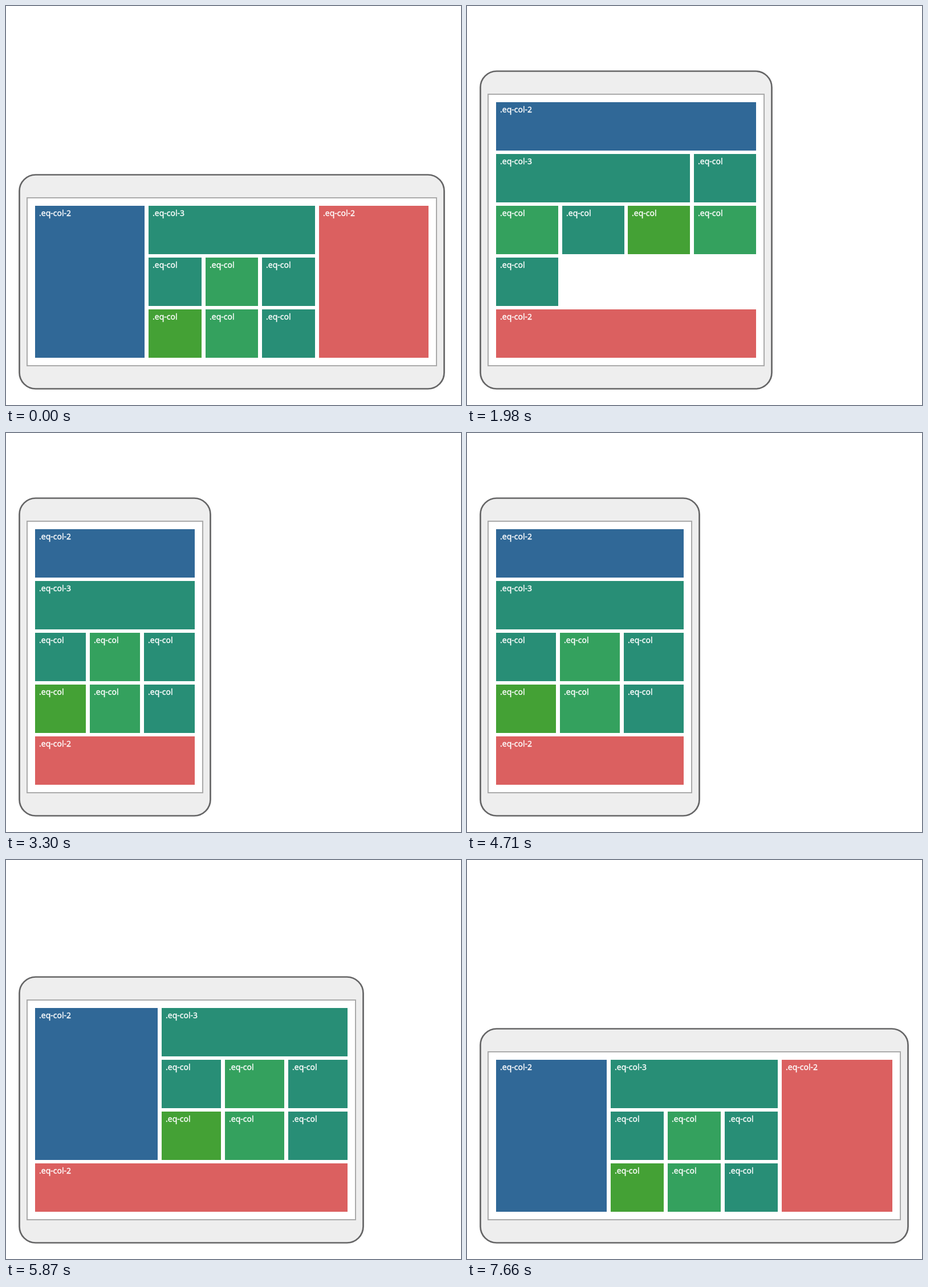
These frames come from a looping animation (798x701 px, 7.95 s). An HTML page:

```html
<!DOCTYPE html>
<html lang="en">
<head>
<meta charset="utf-8">
<title>Equal columns</title>
<style>
html, body { margin: 0; width: 100%; height: 100%; overflow: hidden; background: #fff; }
svg { display: block; width: 798px; height: 701px; }
text { font: 14px "Noto Sans", "Open Sans", sans-serif; fill: #fff; stroke: #fff; stroke-width: .35px; }
</style>
</head>
<body>
<svg id="stage" viewBox="0 0 798 701"></svg>
<script>
const LOOP = 7950, STEP = 78, SHRINK = 450, GROW = 4470;
const LEFT = 51, BOTTOM = 618, GAP = 6.8, PITCH = 91, CELL = 85;
const OUTER_MIN = 96, INNER_MIN = 94;
const BLUE = '#306897', TEAL = '#288e76', GREEN = '#34a15e', LIME = '#44a135', RED = '#db6060';

// The drag: time and right edge of the device
const drag = [
  [400, 770], [1190, 715], [1932, 536], [2820, 396], [3258, 360], [3630, 346],
  [4390, 346], [4704, 409], [5406, 546], [6420, 728], [7590, 775]
];

const stage = document.getElementById('stage');

function set(el, attrs) {
  for (const k in attrs) el.setAttribute(k, attrs[k]);
  return el;
}
function add(tag, attrs) {
  const el = document.createElementNS('http://www.w3.org/2000/svg', tag);
  stage.append(el);
  return set(el, attrs);
}

const body = add('rect', { x: 23.5, rx: 28.5, fill: '#eee', stroke: '#656566', 'stroke-width': 2.7 });
const glass = add('rect', { x: 37, fill: '#fff', stroke: '#aaa', 'stroke-width': 2 });

function makeBox(label, fill) {
  const rect = add('rect', { fill });
  const text = add('text', {});
  text.textContent = label;
  return { rect, text };
}
const first = makeBox('.eq-col-2', BLUE);
const wide = makeBox('.eq-col-3', TEAL);
const cells = [TEAL, GREEN, TEAL, LIME, GREEN, TEAL].map(c => makeBox('.eq-col', c));
const last = makeBox('.eq-col-2', RED);

function place(box, x, w, y, rows = 1) {
  const x0 = Math.round(x), x1 = Math.round(x + w - GAP);
  set(box.rect, { x: x0, y, width: x1 - x0, height: (rows - 1) * PITCH + CELL });
  set(box.text, { x: x0 + 7, y: y + 18 });
}

// Redraws come at a steady beat from the start of each stroke
function snap(t) {
  if (t < SHRINK) return 0;
  const from = t < GROW ? SHRINK : GROW;
  return from + Math.floor((t - from) / STEP) * STEP;
}

const slope = i => (drag[i + 1][1] - drag[i][1]) / (drag[i + 1][0] - drag[i][0]);
function tangent(i) {
  if (i === 0 || i === drag.length - 1) return 0;
  const a = slope(i - 1), b = slope(i);
  return a * b > 0 ? 2 * a * b / (a + b) : 0;
}
// Monotone cubic through the drag points
function edgeAt(t) {
  const end = drag.length - 1;
  if (t <= drag[0][0]) return drag[0][1];
  if (t >= drag[end][0]) return drag[end][1];
  let i = 0;
  while (t >= drag[i + 1][0]) i++;
  const [t0, v0] = drag[i], [t1, v1] = drag[i + 1];
  const d = t1 - t0, u = (t - t0) / d, r = 1 - u;
  return v0 * (1 + 2 * u) * r * r + v1 * u * u * (3 - 2 * u)
    + d * (tangent(i) * u * r * r - tangent(i + 1) * u * u * r);
}

// Greedy rows for the nested group
function flow(width) {
  const cols = Math.max(1, Math.floor(width / INNER_MIN));
  const span = Math.min(3, cols);
  const slots = cells.map((_, i) => ({ col: (span + i) % cols, row: Math.floor((span + i) / cols) }));
  return { span, slots, pitch: width / cols, rows: slots[5].row + 1 };
}

function draw(time) {
  const right = Math.round(edgeAt(snap(time % LOOP)));
  const full = right - 29 - LEFT + GAP;
  const across = [7, 5].find(n => full >= n * OUTER_MIN) || 0;
  const side = across ? full * 2 / across : full;
  const mid = across ? full * 3 / across : full;
  const group = flow(mid);
  const rows = group.rows + (across === 7 ? 0 : across === 5 ? 1 : 2);
  const top = BOTTOM - CELL - (rows - 1) * PITCH;
  const midX = across ? LEFT + side : LEFT;
  const midY = across ? top : top + PITCH;

  set(body, { y: top - 54.5, width: right - 25, height: 727 - top });
  set(glass, { y: top - 14, width: right - 52, height: 646 - top });
  place(first, LEFT, side, top, across ? group.rows : 1);
  place(wide, midX, group.span * group.pitch, midY);
  group.slots.forEach((s, i) =>
    place(cells[i], midX + s.col * group.pitch, group.pitch, midY + s.row * PITCH));
  if (across === 7) place(last, midX + mid, side, top, rows);
  else place(last, LEFT, full, BOTTOM - CELL);
}

const start = performance.now();
function tick() {
  draw(performance.now() - start);
  requestAnimationFrame(tick);
}
draw(0);
requestAnimationFrame(tick);
</script>
</body>
</html>
```
